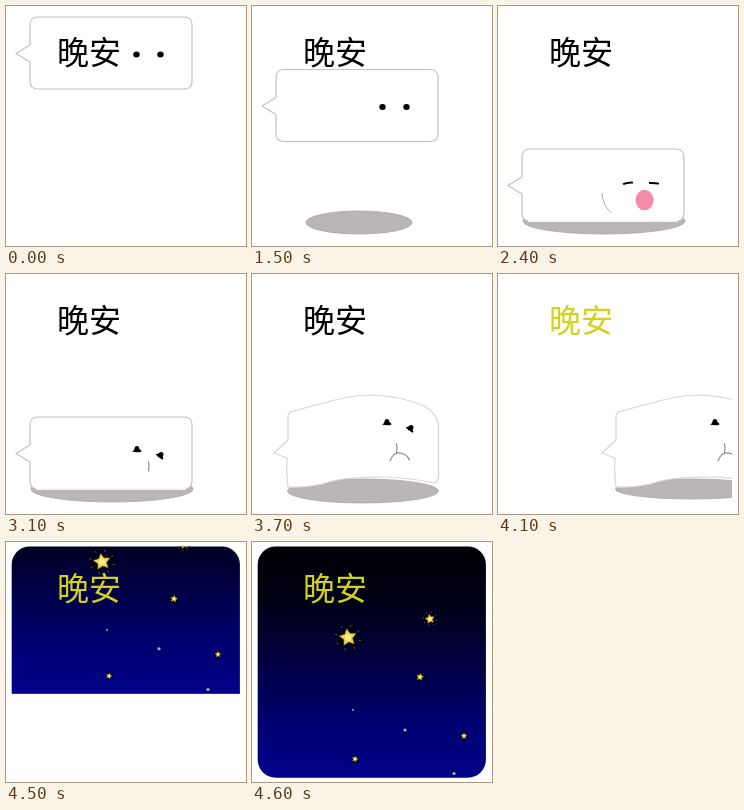
Write an HTML page that moves like this. It is 240 px wide and 240 px high and loops after 6.1 s.

```html
<!DOCTYPE html>
<html lang="zh">
<head>
<meta charset="utf-8">
<style>
  html, body { margin: 0; width: 100%; height: 100%; overflow: hidden; background: #fff; }
  svg { display: block; width: 100vw; height: 100vh; }
  text { font: 300 32px "Noto Sans CJK SC Light", "Noto Sans CJK SC", "Noto Sans CJK", sans-serif; }
  .body { fill: #fff; stroke: #c2c2c2; stroke-width: 1.2; stroke-linejoin: round; }
  .soft { stroke: #d6d6d6; }
  .line { fill: none; stroke: #858585; stroke-width: 1.1; stroke-linecap: round; }
  .lid { fill: none; stroke: #000; stroke-width: 1.9; }
</style>
</head>
<body>
<svg id="stage" viewBox="0 0 240 240">
  <defs>
    <linearGradient id="night" x1="0" y1="0" x2="0" y2="1">
      <stop offset="0" stop-color="#000004"/>
      <stop offset=".25" stop-color="#000016"/>
      <stop offset=".5" stop-color="#000042"/>
      <stop offset=".75" stop-color="#00006e"/>
      <stop offset="1" stop-color="#02028c"/>
    </linearGradient>
    <clipPath id="card"><rect x="5.7" y="4.5" width="228.2" height="231.2" rx="18"/></clipPath>
    <clipPath id="edge"><rect width="234" height="240"/></clipPath>
  </defs>
</svg>
<script>
const stage = document.getElementById('stage');
const LOOP = 6100;

const group = (transform, content) => `<g transform="${transform}">${content}</g>`;
const move = (x, y, content) => group(`translate(${x} ${y})`, content);
const path = (cls, d) => `<path class="${cls}" d="${d}"/>`;
const oval = (x, y, rx, ry, fill) =>
  `<ellipse cx="${x}" cy="${y}" rx="${rx}" ry="${ry}" fill="${fill}"/>`;
const shadow = (x, y, rx, ry) => `<g stroke="#aaa6a6" stroke-width=".8">${oval(x, y, rx, ry, '#bab6b6')}</g>`;
const words = color => `<text x="51" y="58.3" fill="${color}">晚安</text>`;
const black = words('#000'), yellow = words('#d2d21a');

// Speech bubble and its faces
const bubble = path('body', 'M32 11H178Q186 11 186 19V75Q186 83 178 83H32Q24 83 24 75V56L10 47.5 24 39V19Q24 11 32 11Z');
const dots = oval(130.5, 48.5, 3.2, 3, '#000') + oval(154.5, 48.5, 3.2, 3, '#000');
const drop = (y, rx, ry, cy) => shadow(107, cy, rx, ry) + move(0, y, bubble + dots) + black;
const landed = face => shadow(106, 215, 81, 13) + move(0, 132, bubble) +
  `<path d="M30 215H180" stroke="#fff" stroke-width="1.6"/>` + face + black;
const lids = y => move(0, y, path('lid', 'M125 1.2Q130-.8 135-.4M151 0Q156-.2 161 .6'));
const yawn = (rx, ry, cy) => oval(146.5, cy, rx, ry, '#f48ba8');
const arm = d => `<path d="${d}" fill="none" stroke="#aaa"/>`;

// Sleepy face
const eye = '<path d="M-4.8 1.5Q-2.5 .8-2.3-1Q-2-4 .2-4Q2.5-4 2.7-1L4.6 .4V1.8Q0 3-4.8 1.5Z"/>';
const eyes = move(134.7, 149, eye) + group('translate(158 154.5) rotate(38)', eye);
const stem = path('line', 'M144.5 169.5Q145.5 174 144.5 179');
const frown = path('line', 'M138 187Q141 179.5 146 178.8Q154 179 157.5 186');
const pout = stem + frown;

// Walking lump
const lump = path('body soft', 'M36 213Q34 198 35 184L22 179 36 166V143Q36 138.5 40 137.5L79 127Q100 121 122 121Q150 122.5 172 132Q186 140 186.5 154V200Q187 208 182 209Q155 203 125 203Q90 203 70 210Q50 214 36 213Z') + eyes + pout;
const leaving = path('body soft', 'M165 211Q168 195 166 180L155 175Q164 171 164 163Q165 152 168 149L179 136Q183 133 195 134L245 139V214Q190 207 165 211Z');
const inFrame = content => `<g clip-path="url(#edge)">${content}</g>`;

// Night sky
function star(x, y, r, turn = 0, rays = 0) {
  const at = (i, d, step) => {
    const a = turn + i * step - Math.PI / 2;
    return `${(x + d * Math.cos(a)).toFixed(2)} ${(y + d * Math.sin(a)).toFixed(2)}`;
  };
  let points = [], beams = '';
  for (let i = 0; i < 10; i++) points.push(at(i, i % 2 ? r * .52 : r, Math.PI / 5));
  for (let i = 0; i < rays; i++) {
    const step = 2 * Math.PI / rays;
    beams += `M${at(i + .5, r * 1.25, step)}L${at(i + .5, r * 1.5, step)}`;
  }
  return oval(x, y, r * 1.5, r * 1.5, 'rgba(0,0,15,.45)') +
    `<polygon points="${points}" fill="#f0d84c" stroke="#8a7420" stroke-width=".6" stroke-linejoin="round"/>` +
    oval(x, y, r * .35, r * .35, '#fbeb90') +
    `<path d="${beams}" stroke="#6e6028"/>`;
}
const speck = (x, y, r) => oval(x, y, r, r, '#b5ae8c');
const stars = star(96, 95.5, 8.8, -.15, 8) + star(178, 77, 4.8, -.2, 8) +
  star(168, 135, 3.6, .2) + star(212, 194, 3.1) + star(103, 217, 3, .3) +
  speck(153, 188, 1.6) + speck(202, 231.5, 1.6) + speck(101, 168, 1);
const sky = (scale, y) => `<g clip-path="url(#card)">` + group(`matrix(1 0 0 ${scale} 0 ${y})`,
  '<rect x="5" y="4" width="230" height="232" fill="url(#night)"/>' + stars) + '</g>';

// [start in ms, picture]
const steps = [
  [0, bubble + dots + black],
  [1500, drop(52.5, 53, 11.5, 216.5)],
  [1600, drop(92, 68, 12, 216)],
  [1700, landed(move(0, 132, dots))],
  [2000, landed(lids(180.5) + yawn(5.5, 6, 198.5))],
  [2200, landed(lids(180) + yawn(7.5, 8.5, 196) + arm('M103 192Q105 202 111 207'))],
  [2400, landed(lids(177) + yawn(9, 10.3, 194) + arm('M104 187Q105 200 113.5 207'))],
  [3100, landed(move(-4, 27, eyes) + move(-2, 18, stem))],
  [3300, landed(move(-4, 27, eyes) + move(-2, 18, pout))],
  [3700, shadow(111, 217, 75.5, 12) + lump + black],
  [3900, group('matrix(.957 0 0 1 31 0)', shadow(111, 217, 75.5, 11) + lump) + black],
  [4100, inFrame(move(82, 0, shadow(111, 215, 75.5, 10) + lump)) + yellow],
  [4300, sky(.95, -160.5) + inFrame(group('rotate(2 222 217)', shadow(222, 217, 61, 8)) + leaving) + yellow],
  [4500, sky(.94, -70) + yellow],
  [4600, sky(1, 0) + yellow]
];

stage.insertAdjacentHTML('beforeend', steps.map(s => `<g class="step" display="none">${s[1]}</g>`).join(''));
const scenes = stage.querySelectorAll('.step');
const start = performance.now();
let shown = -1;

function tick() {
  const t = (performance.now() - start) % LOOP;
  const next = steps.findLastIndex(s => s[0] <= t);
  if (next !== shown) {
    scenes.forEach((g, i) => g.setAttribute('display', i === next ? 'inline' : 'none'));
    shown = next;
  }
  requestAnimationFrame(tick);
}
tick();
</script>
</body>
</html>
```
